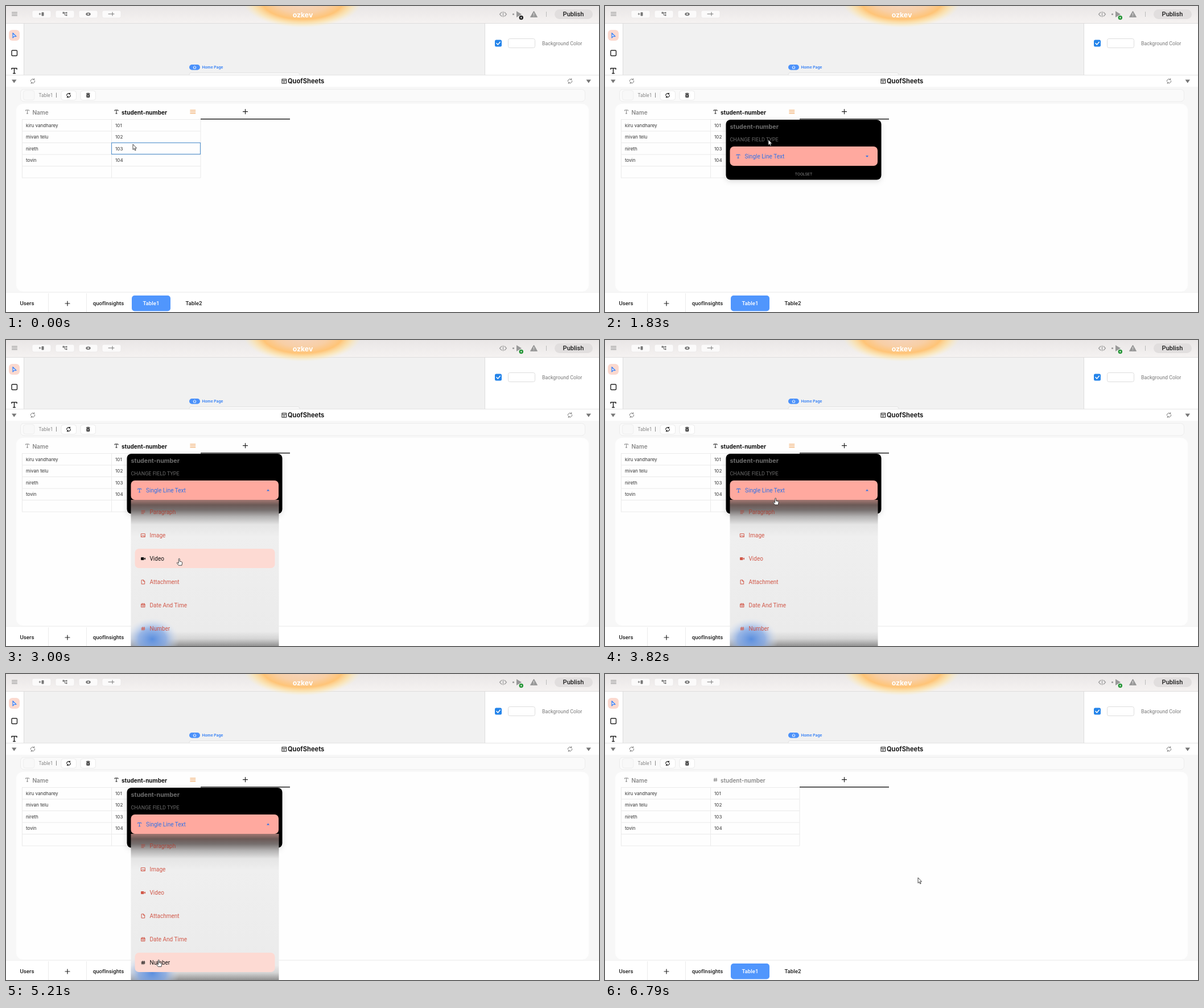
An HTML page that plays this animation: 1042x538 px, repeating every 6860 ms.

```html
<!DOCTYPE html>
<html lang="en">
<head>
<meta charset="utf-8">
<title>Change a field type</title>
<style>
html, body { margin: 0; width: 100%; height: 100%; overflow: hidden; background: #f7f7f7; }
svg { display: block; width: 100vw; height: 100vh; }
text { font: 10px Roboto, sans-serif; fill: #1c1c1c; dominant-baseline: central; }
.mid { text-anchor: middle; }
.wide { font: 700 10px Inter, sans-serif; }
.cell { font: 8.1px Inter, sans-serif; fill: #333; }
.tab { font-size: 9.7px; font-weight: 500; }
.small { font-size: 7.1px; fill: #858585; }
.action { font-size: 9.5px; fill: #ffb7aa; }
.line { fill: none; stroke: currentColor; stroke-linecap: round; stroke-linejoin: round; }
</style>
</head>
<body>
<svg viewBox="0 0 1042 538" preserveAspectRatio="none">
  <defs>
    <radialGradient id="glow">
      <stop offset="0" stop-color="#f4d6c4"/>
      <stop offset=".45" stop-color="#f8cfa6"/>
      <stop offset=".68" stop-color="#ffc477"/>
      <stop offset=".84" stop-color="#ffdf9c" stop-opacity=".65"/>
      <stop offset="1" stop-color="#ffeebb" stop-opacity="0"/>
    </radialGradient>
    <linearGradient id="topBar" x2="0" y2="1">
      <stop stop-color="#e9e6e6"/><stop offset="1" stop-color="#f5f2f1"/>
    </linearGradient>
    <linearGradient id="glass" gradientUnits="userSpaceOnUse" x1="0" y1="281" x2="0" y2="538">
      <stop stop-color="#a37872"/>
      <stop offset=".035" stop-color="#6b5956"/>
      <stop offset=".07" stop-color="#77706f"/>
      <stop offset=".115" stop-color="#b4b3b3"/>
      <stop offset=".17" stop-color="#e5e5e5"/>
      <stop offset=".25" stop-color="#efefef"/>
      <stop offset=".9" stop-color="#ebebeb"/>
      <stop offset=".95" stop-color="#d5d5d5"/>
      <stop offset="1" stop-color="#929292"/>
    </linearGradient>
    <radialGradient id="blueBlur">
      <stop stop-color="#5b8fdf"/>
      <stop offset=".5" stop-color="#85aae6" stop-opacity=".8"/>
      <stop offset="1" stop-color="#dfe6f2" stop-opacity="0"/>
    </radialGradient>
    <filter id="shadow" x="-20%" y="-20%" width="140%" height="150%">
      <feDropShadow dx="0" dy="3" stdDeviation="5" flood-opacity=".13"/>
    </filter>
    <clipPath id="listClip"><rect id="listWindow" x="219" y="281" width="261" height="0"/></clipPath>
    <g id="letterT"><path class="line" d="M-3 -1.8V-3H3V-1.8M0 -3V3M-1.2 3H1.2"/></g>
    <g id="sync"><path class="line" d="M-3.6 .5A3.6 3.6 0 0 1 2.5 -2.6M3.6 -.5A3.6 3.6 0 0 1 -2.5 2.6M2.7 -4.3V-2.4H.9M-2.7 4.3V2.4H-.9"/></g>
    <g id="plus"><path class="line" d="M-4 0H4M0 -4V4"/></g>
    <g id="bin"><path class="line" d="M-3 -2.3H3M-1.2 -3.4H1.2M-2.3 -2.1V3.4H2.3V-2.1"/></g>
    <g id="hash"><path class="line" d="M-1 -3 -1.8 3M1.8 -3 1 3M-3 -1H3M-3 1.2H3"/></g>
    <g id="bars"><path class="line" d="M-4.5 -2.8H4.5M-4.5 0H4.5M-4.5 2.8H4.5"/></g>
  </defs>

  <!-- editor behind the sheet -->
  <rect width="1042" height="538" fill="#f7f7f7"/>
  <rect y="30" width="1042" height="92" fill="#f1f1f1"/>
  <rect width="1042" height="30" fill="url(#topBar)"/>
  <path d="M0 30.5H1042" stroke="#dedcdc"/>
  <ellipse cx="521" cy="-8" rx="104" ry="46" fill="url(#glow)"/>
  <rect y="31" width="31" height="91" fill="#fff"/>
  <rect x="842" y="31" width="200" height="91" fill="#fff"/>
  <path d="M31.5 31V122M841.5 31V122" stroke="#dcdcdc"/>
  <use href="#bars" x="15" y="14" color="#888"/>
  <g fill="#fbfafa" stroke="#e8e5e5" stroke-width=".6" id="toolButtons"></g>
  <g color="#777" fill="#777">
    <path class="line" d="M58 14H61M59.5 12.5V15.5"/><rect x="62.500" y="11" width="4" height="6.500" rx="1"/>
    <path class="line" d="M101 12H105M103 12V16H106"/><rect x="99.500" y="10.500" width="3" height="3"/><rect x="105" y="10.800" width="2.500" height="2.500"/><rect x="105" y="14.800" width="2.500" height="2.500"/>
    <ellipse cx="144.500" cy="14.300" rx="4.200" ry="2.800"/><circle cx="144.500" cy="14.300" r="1.200" fill="#fff"/>
    <path class="line" d="M180 14H190M187 11V17"/>
  </g>
  <text class="wide mid" x="521.500" y="15" style="font-size:12.300px;fill:#fff">ozkev</text>
  <g color="#999" fill="#999">
    <path class="line" stroke-width="1.200" d="M871 11 867.500 14.500 871 18M876 11 879.500 14.500 876 18M873.500 10V19"/>
    <circle cx="891.500" cy="14.500" r="1.600"/>
    <path d="M897 9 906 14.500 897 20Z"/>
    <path d="M927.500 9 933.500 19.500H921.500Z" stroke="#999" stroke-linejoin="round"/>
    <path d="M927.500 12.500V15.700M927.500 17V18" stroke="#f2efef"/>
    <path d="M949.500 10V19" stroke="#bbb"/>
  </g>
  <circle id="badge" cx="905.300" cy="20.500" r="3.700"/>
  <path d="M905.300 18.700V22.300M904 20.500H906.600" stroke="#fff" stroke-width=".8"/>
  <rect x="964" y="6" width="67" height="17" rx="8.500" fill="#e1dede"/>
  <text class="mid" x="997" y="14.700" style="font-size:11px;font-weight:500">Publish</text>

  <rect x="5" y="42" width="19" height="19" rx="6" fill="#fbd9cf"/>
  <path d="M12 47.500V56L14 53.700 18 53.500Z" fill="#dbe8ff" stroke="#3b82f6" stroke-width="1.200" stroke-linejoin="round"/>
  <rect x="10" y="78" width="9.500" height="9.500" rx="1.500" fill="none" stroke="#222" stroke-width="1.400"/>
  <use href="#letterT" transform="translate(14.500 114) scale(1.500)" color="#222"/>
  <rect x="322" y="103" width="19" height="9.500" rx="4.700" fill="#4b91fa"/>
  <path class="line" color="#fff" stroke-width=".9" d="M329 107.500 331.500 105.300 334 107.500M329.700 107.500V110H333.300V107.500"/>
  <text class="wide" x="344.500" y="107.700" style="font-size:6.700px;fill:#3f86f5">Home Page</text>
  <rect x="322" y="117.500" width="194" height="10" rx="3" fill="#fafafa" stroke="#e2e2e2"/>
  <rect x="859" y="59.500" width="12" height="12" rx="2.500" fill="#2484ea"/>
  <path class="line" color="#fff" stroke-width="1.500" d="M862 65.500 864.300 67.900 868.300 63.200"/>
  <rect x="882.500" y="57.500" width="47" height="16" rx="3" fill="#fff" stroke="#ddd"/>
  <text x="942" y="65.500" style="font-size:8.850px;fill:#777">Background Color</text>

  <!-- sheet -->
  <rect y="122" width="1042" height="20" fill="#fff"/>
  <path d="M0 121.500H1042" stroke="#e4e4e4"/>
  <g fill="#777"><path d="M10 129.500H18.500L14.200 135.500Z"/><path d="M1019.500 129.500H1028L1023.700 135.500Z"/></g>
  <use href="#sync" x="47" y="132" color="#777"/><use href="#sync" x="991" y="132" color="#777"/>
  <path class="line" stroke-width="1.100" color="#222" d="M485 128.500H492.500V136H485ZM485 131H492.500M488.500 131V136"/>
  <text class="wide" x="495" y="132" style="font-size:11.100px">QuofSheets</text>
  <rect x="25.500" y="146.500" width="992" height="21.500" rx="6" fill="#fafafa" stroke="#ececec"/>
  <rect x="30.500" y="148.500" width="19.500" height="17" rx="4" fill="#f8f8f8" stroke="#eee"/>
  <path id="bolt" d="M42 152.500 37 158H40L39 162 44 156.300H41Z" fill="#f5a04d"/>
  <text x="57.500" y="157" style="font-size:8.400px;fill:#888">Table1</text>
  <path d="M88.500 152.500V161" stroke="#888"/>
  <g fill="#fff" stroke="#ebebeb"><rect x="97" y="149" width="26.500" height="16.500" rx="4"/><rect x="131" y="149" width="26.500" height="16.500" rx="4"/></g>
  <use href="#sync" transform="translate(110 157) scale(.9)" color="#222" stroke-width="1.300"/>
  <path d="M141 154.500H147.500V153.300H145.500L145 152.700H143.500L143 153.300H141ZM141.500 155.300H147V160.700H141.500Z" fill="#222"/>
  <path d="M143.300 157H145.200V159H143.300Z" fill="#fff"/>
  <rect x="18" y="172" width="1006" height="330" rx="12" fill="#fefefe"/>
  <path id="grid" stroke="#eaeaea" fill="none"/>
  <use href="#letterT" x="37.500" y="186" color="#888"/>
  <text class="wide" x="46.500" y="186.500" style="font-weight:600;fill:#888">Name</text>
  <g id="header">
    <use id="headerIcon" href="#letterT" x="194" y="186"/>
    <text class="wide" id="headerText" x="203" y="186.500">student-number</text>
  </g>
  <circle id="halo" cx="328.500" cy="186" r="13.500" fill="#efefef"/>
  <use id="headerMenu" href="#bars" x="328.300" y="186" color="#ee9a4c"/>
  <use href="#plus" x="420.500" y="185.700" color="#222" stroke-width="1.200"/>
  <path d="M342 198.700H499" stroke="#222" stroke-width="1.600"/>
  <g id="cells"></g>
  <rect id="cellFocus" x="185.500" y="240.500" width="156" height="20" fill="none" stroke="#5f98d0" stroke-width="1.200"/>

  <rect y="504" width="1042" height="34" fill="#fff"/>
  <path d="M0 503.500H1042" stroke="#f0f0f0"/>
  <path d="M74.500 505V538M141.500 505V538" stroke="#ececec"/>
  <rect x="221" y="509" width="68" height="27.500" rx="5" fill="#5096fd"/>
  <use href="#plus" x="108" y="523" color="#222" stroke-width="1.200"/>
  <g id="tabs"></g>

  <!-- column menu -->
  <g id="menu">
    <rect x="212.500" y="200" width="136.500" height="204.500" rx="8" fill="#272727" filter="url(#shadow)"/>
    <path d="M213 251.500H349M213 278.500H349M213 330.500H349M213 357.500H349" stroke="#4a4a4a"/>
    <g id="menuText"></g>
    <g color="#ffb7aa">
      <path class="line" d="M221.500 236V242H226.500V239H224V236ZM224 239 226 236.500"/>
      <path class="line" d="M222 268.500H223.500V270M225 265.500V264M225 265.500H226.500M223 268.700 222 269.700M225.200 265.200 226.500 264"/>
      <path class="line" d="M221.500 321 222 318.800 225.500 315.300 227 316.800 223.500 320.400Z"/>
      <use href="#bin" x="224" y="345.500"/>
    </g>
  </g>
  <g id="tooltip">
    <rect x="304" y="204" width="47" height="11.500" rx="4" fill="#f7f7f7"/>
    <text class="mid" x="328" y="210" style="font-size:8.300px">Actions</text>
  </g>

  <!-- field type panel -->
  <g id="panel">
    <rect x="212.500" y="200" width="273" height="105.500" rx="8" filter="url(#shadow)"/>
    <text class="wide" x="219.500" y="212.500" style="font-size:10.700px;fill:#6c6c6c">student-number</text>
    <text x="219.500" y="235" style="font-size:9px;fill:#6c6c6c">CHANGE FIELD TYPE</text>
    <text class="small mid" x="349" y="295">TOOLSET</text>
    <path id="listEdge" d="M219.500 278V290Q219.500 296.500 226 296.500H472Q478.500 296.500 478.500 290V278" fill="none" stroke="#333"/>
    <g clip-path="url(#listClip)" id="list">
      <rect x="219.500" y="281" width="260" height="258" fill="url(#glass)"/>
      <ellipse cx="257" cy="526" rx="48" ry="38" fill="url(#blueBlur)" clip-path="url(#listClip)"/>
      <rect id="itemFocus" x="226.500" width="246" height="34" rx="7" fill="#fddad3"/>
      <g id="items"></g>
    </g>
    <rect x="219.500" y="247" width="259.500" height="34" rx="7" fill="#ffa99f"/>
    <g id="oldType" color="#2f72e8"><use href="#letterT" x="234" y="264.300"/><text x="245.500" y="264" style="fill:#2f72e8">Single Line Text</text></g>
    <g id="newType" color="#2f72e8"><use href="#hash" x="234" y="264.500"/><text x="245.500" y="264" style="fill:#2f72e8">Number</text></g>
    <path id="caretDown" d="M458 263H463L460.500 266Z" fill="#2f72e8"/>
    <path id="caretUp" d="M458 265.500H463L460.500 262.500Z" fill="#2f72e8"/>
  </g>

  <g id="cursor" fill="#fff" stroke="#333" stroke-width=".9" stroke-linejoin="round">
    <path id="arrow" d="M0 0V9.500L2.200 7.600 3.700 11 5.200 10.300 3.700 7H6.500Z"/>
    <path id="hand" d="M-1 .6a1 1 0 0 1 2 0V4.600L4.600 5.400Q5.600 5.800 5.400 7L4.600 11.500H-1L-4 7.600Q-4.200 6.400 -2.800 6.600L-1 8Z"/>
  </g>
</svg>
<script>
const LOOP = 6860, STEP = 70;
const el = id => document.getElementById(id);
const set = (id, name, value) => el(id).setAttribute(name, value);
const alpha = (id, value) => set(id, 'opacity', value);
const ramp = (t, from, to) => Math.min(1, Math.max(0, (t - from) / (to - from)));
const label = (x, y, text, cls) => `<text x="${x}" y="${y}" class="${cls}">${text}</text>`;

el('toolButtons').innerHTML = [46, 87, 128, 169]
  .map(x => `<rect x="${x}" y="8" width="33" height="13" rx="3"/>`).join('');
set('grid', 'd', [199.5, 220, 240.5, 261, 281.5, 302].map(y => `M28 ${y}H342`).join('')
  + [28.5, 185.5, 342].map(x => `M${x} 199V302`).join(''));
el('cells').innerHTML = ['kiru vandharey', 'mivan telu', 'nireth', 'tovin'].map((name, i) => {
  const y = 209.7 + i * 20.5;
  return label(35, y, name, 'cell') + label(192, y, 101 + i, 'cell');
}).join('');
el('tabs').innerHTML = [[37, 'Users'], [180, 'quofInsights'], [255, 'Table1'], [330, 'Table2']]
  .map(([x, name]) => label(x, 522.7, name, 'tab mid')).join('');
document.querySelectorAll('.tab')[2].style.fill = '#fff';
el('menuText').innerHTML = label(220, 217, 'ACTIONS', 'small') + label(220, 296.3, 'EDIT', 'small')
  + label(266, 394, 'TOOLSET', 'small')
  + [[239, 'Change field type'], [266.5, 'Connect field with'], [318.3, 'Rename'], [345.7, 'Delete']]
    .map(([y, name]) => label(235, y, name, 'action')).join('');

const line = d => `<path class="line" d="${d}"/>`;
const types = [
  ['Paragraph', line('M-3 -2.5H3M-3 0H3M-3 2.5H1')],
  ['Image', line('M-3.3 -2.8H3.300V2.800H-3.300ZM-3 2 -.8 -.2 1 1.500 2 .6 3.200 2')],
  ['Video', '<rect x="-4" y="-2.500" width="5.500" height="5" rx="1" fill="currentColor"/><path d="M2 -.5 4 -2V2L2 .5Z" fill="currentColor"/>'],
  ['Attachment', line('M-2.500 -3.500H.5L2.700 -1.300V3.500H-2.500ZM.5 -3.500V-1.300H2.700')],
  ['Date And Time', line('M-3 -2.500H3V3.200H-3ZM-3 -.8H3M-1.500 -3.500V-2M1.500 -3.500V-2M-1.500 1.200H1.500')],
  ['Number', '<use href="#hash"/>']
];
const itemY = i => 302 + i * 41;
el('items').innerHTML = types.map(([name, icon], i) =>
  `<g><g transform="translate(241 ${itemY(i) + .5})">${icon}</g>${label(252.5, itemY(i), name, '')}</g>`).join('');
const items = [...el('items').children];

// time, x, y of the pointer tip
const path = [
  [0, 223, 243], [540, 327, 189], [1080, 327, 189], [1490, 287, 237], [1830, 287, 235],
  [2030, 287, 235], [2300, 300, 270], [2440, 300, 270], [2720, 303, 330], [3000, 304.500, 392],
  [3140, 303, 402], [3500, 292, 508], [3820, 300, 268], [3890, 300, 275], [4200, 298, 385],
  [4370, 296, 335], [4510, 292, 398], [4650, 287, 443], [5000, 274, 470], [5210, 268, 505],
  [5420, 268, 505], [5630, 273, 479], [5980, 274, 478], [6370, 532, 350], [6650, 545, 355], [6790, 550, 358]
];

function pointer(t) {
  const next = path.findIndex(p => p[0] > t);
  if (next < 0) return path[path.length - 1].slice(1);
  const [t0, x0, y0] = path[next - 1], [t1, x1, y1] = path[next];
  const k = ramp(t, t0, t1), e = k * k * (3 - 2 * k);
  return [x0 + (x1 - x0) * e, y0 + (y1 - y0) * e];
}

function draw(t) {
  const [x, y] = pointer(t);
  const open = t < 5350 ? ramp(t, 2440, 2650) : 1 - ramp(t, 5350, 5650);
  const menu = ramp(t, 930, 1050) * (1 - ramp(t, 1640, 1800));
  const onIcon = t < 1500 && Math.hypot(x - 328, y - 187) < 14;
  const onSelect = t > 2030 && t < 5420 && y > 247;
  const onMenu = t > 1080 && t < 1740;

  set('cursor', 'transform', `translate(${x} ${y})`);
  const hand = onIcon || onSelect || onMenu;
  alpha('hand', +hand);
  alpha('arrow', +!hand);

  const row = Math.floor((y - 199.5) / 20.5);
  alpha('cellFocus', +(t < 930 && row >= 0 && x > 185));
  set('cellFocus', 'y', 199.5 + row * 20.5);

  const active = t < 6690;
  set('headerIcon', 'href', t < 5980 ? '#letterT' : '#hash');
  set('header', 'color', active ? '#222' : '#888');
  el('headerText').style.fill = active ? '#111' : '#888';
  el('headerText').style.fontWeight = active ? 700 : 600;
  alpha('headerMenu', +active);
  alpha('halo', +onIcon);
  alpha('tooltip', ramp(t, 930, 1050) * (1 - ramp(t, 1200, 1340)));
  set('badge', 'fill', t < 1690 ? '#222' : '#249536');
  alpha('bolt', +(t >= 5500 && t < 6120));

  alpha('menu', menu);
  alpha('panel', ramp(t, 1620, 1790) * (1 - ramp(t, 6430, 6640)));
  set('listWindow', 'height', 258 * open);
  alpha('list', Math.min(1, open * 2));
  alpha('listEdge', +(open > 0 && open < 1));
  const chosen = ramp(t, 5490, 5700);
  alpha('oldType', 1 - chosen);
  alpha('newType', chosen);
  alpha('caretUp', t < 5490 ? open : 1 - chosen);
  alpha('caretDown', t < 5490 ? 1 - open : chosen);
  const shift = open > .5 ? .6 : 0;
  set('oldType', 'transform', `translate(${shift} ${shift / 2})`);

  const hovered = y > 283 ? Math.round((y - 302) / 41) : -1;
  alpha('itemFocus', +(hovered >= 0));
  set('itemFocus', 'y', itemY(hovered) - 17);
  items.forEach((item, i) => {
    const color = i === hovered ? '#111' : i ? '#d1594a' : '#a8463b';
    item.setAttribute('color', color);
    item.lastChild.style.fill = color;
  });
}

function tick() {
  const t = performance.now() % LOOP;
  draw(Math.floor(t / STEP) * STEP);
  requestAnimationFrame(tick);
}
tick();
</script>
</body>
</html>
```
